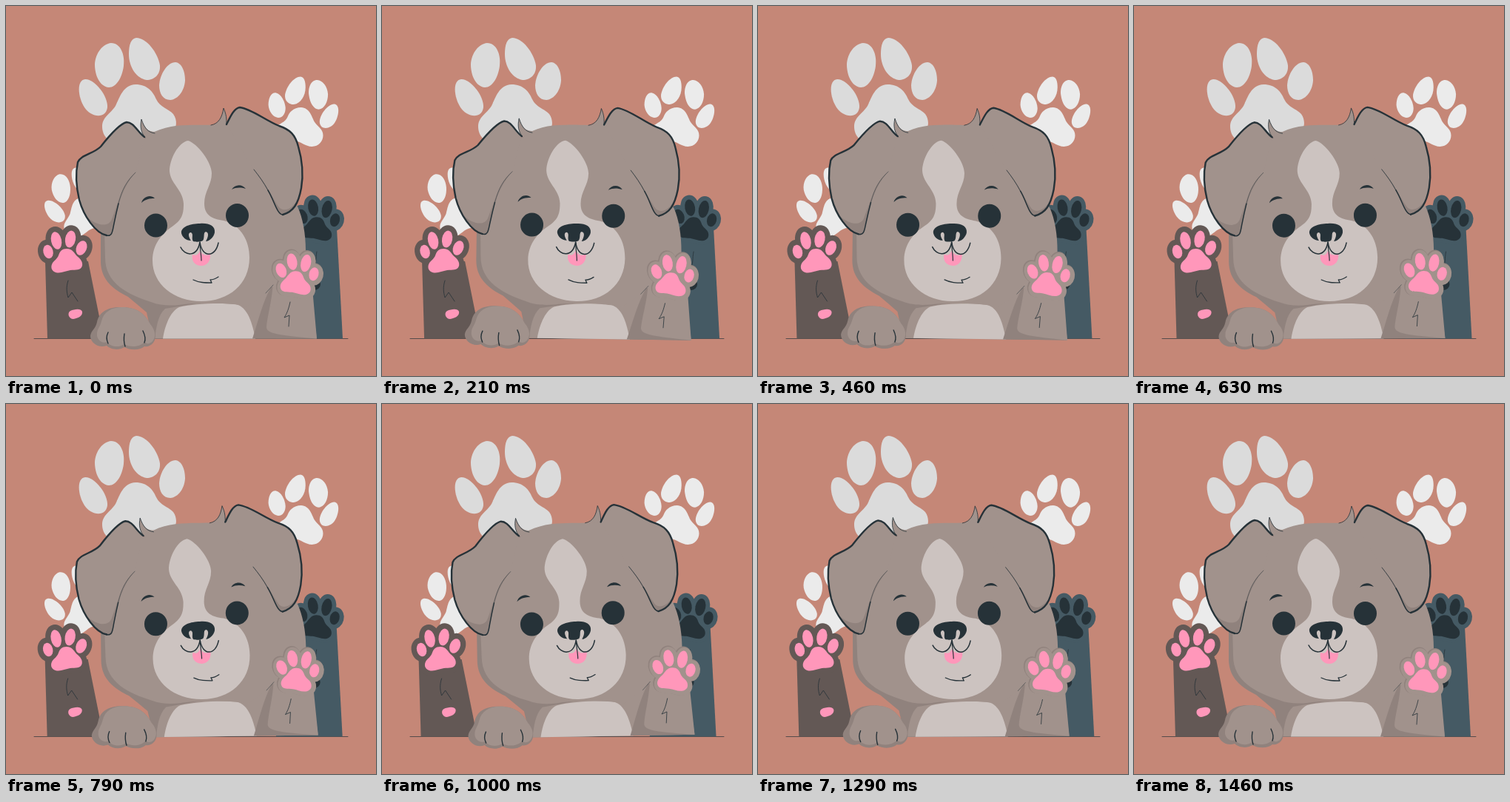
Recreate the animation shown at these times as an HTML page. Size 500 px wide and 500 px high, loop 1.5 s.

```html
<!DOCTYPE html>
<html lang="en">
<head>
<meta charset="utf-8">
<title>Waving paws</title>
<style>
  html, body { margin: 0; height: 100%; overflow: hidden; background: #c58777; }
  svg { display: block; width: 100vw; height: 100vh; }
  .fur { fill: #a1928c; }
  .shade { fill: #90827d; }
  .light { fill: #ccc3c0; }
  .ink { fill: #263238; }
  .pink { fill: #ff97ba; }
  .line { fill: none; stroke: #263238; stroke-linecap: round; stroke-linejoin: round; }
  .thin { stroke-width: .8; }
  .mid { stroke-width: 1.5; }
  .bold { stroke-width: 2.4; }
</style>
</head>
<body>
<svg viewBox="0 0 500 500">
  <defs>
    <g id="print">
      <path d="M-73-44C-61-45-42-22-43-6C-45 10-65 8-74-6C-83-20-85-43-73-44Z"/>
      <path d="M-38-93C-25-93-19-77-21-62C-23-46-31-33-41-33C-53-34-60-49-60-64C-59-80-49-92-38-93Z"/>
      <path d="M-4-100C10-100 25-80 28-63C29-50 20-43 10-43C-4-45-14-61-14-78C-14-91-11-99-4-100Z"/>
      <path d="M49-67C58-66 62-54 62-42C61-29 53-17 42-16C32-16 27-25 27-36C28-51 38-67 49-67Z"/>
      <path d="M-5-37C11-37 19-27 23-17C28-6 40-4 46 3C52 11 51 23 44 28C34 34 20 29 8 31C-5 33-14 43-27 43C-41 43-50 32-50 20C-50 7-39 3-32-8C-26-20-22-36-5-37Z"/>
    </g>
    <g id="pads">
      <ellipse rx="6.6" ry="9.3" transform="translate(-25 -13) rotate(-14)"/>
      <ellipse rx="7" ry="12" transform="translate(-14 -28) rotate(-12)"/>
      <ellipse rx="7" ry="11.5" transform="translate(5 -30) rotate(10)"/>
      <ellipse rx="7" ry="10.2" transform="translate(20 -18) rotate(22)"/>
      <path d="M0-17C8-17 10-11 14-7C19-3 22 1 21 6C19 13 12 11 5 12C-2 13-8 17-15 15C-21 13-22 7-19 2C-16-2-13-3-11-8C-9-14-6-17 0-17Z"/>
    </g>
  </defs>

  <rect width="500" height="500" fill="#c58777"/>
  <use href="#print" fill="#dbdbdb" transform="translate(180 143)"/>
  <use href="#print" fill="#ebebeb" transform="translate(395.5 161.5) scale(-.66 .66)"/>
  <use href="#print" fill="#ebebeb" transform="translate(108 282) rotate(-11) scale(.65)"/>
  <path class="line" stroke-width=".7" d="M38 449.5H462"/>

  <g class="shaking">
    <path fill="#635855" d="M53 345L56 449.500H132L111 345Z"/>
    <g transform="translate(82 345)">
      <use href="#pads" fill="#635855" stroke="#635855" stroke-width="14.500" stroke-linejoin="round"/>
      <use href="#pads" class="pink"/>
    </g>
    <path class="pink" d="M87 412C92 410 101 408 103 413C104 419 97 422 91 423C85 423 82 415 87 412Z"/>
    <path class="line thin" d="M84 371C81 380 82 387 84 394L89 387L97 399"/>
  </g>

  <g class="shaking">
    <path fill="#455a64" d="M398 305L365 449.500H455L447 300Z"/>
    <g transform="translate(420 302) scale(-.98 .98)">
      <use href="#pads" fill="#455a64" stroke="#455a64" stroke-width="12" stroke-linejoin="round"/>
      <use href="#pads" class="ink"/>
    </g>
    <ellipse class="ink" cx="416" cy="376" rx="9" ry="8"/>
    <path class="line thin" d="M420 332C418 342 420 348 416 354"/>
  </g>

  <g id="dog">
    <!-- body and head -->
    <path class="shade" d="M128 290V345C128 370 145 383 165 393L177 403L190 414L198 449.500H419L405 345Z"/>
    <path class="fur" d="M215 409C205 418 203 435 201 449.500H337L360 376L300 395Z"/>
    <path class="light" d="M212 449.500C214 435 221 413 234 407C253 402 290 401 310 403C327 406 333 430 337 449.500Z"/>
    <path class="fur" d="M188 178C204 165 226 161 246 161C262 160 282 162 299 159L394 271C401 286 405 308 405 330L402 372L358 380C347 393 334 401 325 406C310 401 255 400 234 404C222 405 208 405 196 400C165 390 134 375 134 340L133 300L150 200Z"/>
    <path class="light" d="M246 182C258 185 278 211 278 226C278 242 268 250 268 267C268 283 279 288 294 290C318 296 329 318 329 340C329 376 301 399 264 399C227 399 198 376 198 344C198 322 211 307 226 297C239 288 240 279 240 267C239 248 222 240 221 223C221 207 233 184 246 182Z"/>

    <!-- ears -->
    <path class="fur" d="M188 178C182 170 181 163 183 153C187 165 192 171 205 170Z"/>
    <path class="line thin" d="M188 178C182 170 181 163 183 153C187 165 192 171 201 172"/>
    <path class="fur" d="M187 177C178 171 173 157 163 157C154 159 139 176 128 190C118 200 101 201 97 211C94 225 95 245 99 262C105 284 121 307 136 311C144 312 144 303 146 294C151 268 158 244 175 225Z"/>
    <path class="shade" d="M175 225C156 240 151 270 143 288C139 299 124 298 109 285C116 297 126 308 136 310C144 311 144 303 146 294C151 268 158 244 175 225Z"/>
    <path class="line bold" d="M187 177C178 171 173 157 163 157C154 159 139 176 128 190C118 200 101 201 97 211C94 225 95 245 99 262C105 284 121 307 136 310"/>
    <path class="line mid" d="M136 310C144 312 144 303 146 294C148 284 150 275 152 267"/>
    <path class="line" stroke-width=".5" d="M152 267C157 247 163 237 175 225"/>
    <path class="fur" d="M276 162C288 159 292 150 294 138C298 147 298 152 298 160Z"/>
    <path class="line thin" d="M277 161C288 159 292 150 294 138C298 147 298 152 298 160"/>
    <path class="fur" d="M298 160C303 150 308 138 316 137C332 139 351 155 369 162C384 167 391 174 395 190C400 207 402 228 399 246C395 268 388 278 374 282C365 282 361 254 335 221Z"/>
    <path class="shade" d="M335 221C352 239 362 264 370 273C378 279 388 273 395 260C390 274 384 280 374 282C365 282 361 254 335 221Z"/>
    <path class="line bold" d="M298 160C303 150 308 138 316 137C332 139 351 155 369 162C384 167 391 174 395 190C400 207 402 228 399 246C395 268 388 278 374 282"/>
    <path class="line mid" d="M374 282C366 281 363 264 354 249"/>
    <path class="line thin" d="M354 249C348 238 342 230 335 221"/>

    <!-- face -->
    <ellipse class="ink" cx="202.500" cy="296.500" rx="15.500" ry="16"/>
    <ellipse class="ink" cx="312.500" cy="283" rx="15.500" ry="16"/>
    <path class="ink" d="M183 266C185 258 195 254 201 260C194 260 188 261 183 266Z"/>
    <path class="ink" d="M305 248C309 241 319 240 324 247C317 245 311 245 305 248Z"/>
    <path class="pink" d="M252 336C257 338 260 336 262 331C266 337 270 338 276 335C277 344 272 351 264 351C256 351 250 345 252 336Z"/>
    <path class="ink" d="M237 307C236 298 250 294 262 294C274 293 283 297 282 306C281 312 275 318 270 318C273 313 275 306 270 305C266 306 269 313 266 317C263 319 256 319 253 318C250 314 254 308 250 306C245 306 247 313 250 317C243 317 238 312 237 307Z"/>
    <path class="line mid" d="M236 326C241 337 258 341 262 319C265 341 283 340 287 320"/>
    <path class="line" stroke-width="1.200" d="M262 319C262 328 264 336 264 344"/>
    <path class="line" stroke-width="1.300" d="M253 370C261 374 269 374 278 374L276 370C281 370 284 368 287 366"/>

    <!-- raised arm -->
    <path class="shade" d="M358 380C347 400 341 425 333 449.500H420L411 380Z"/>
    <path class="fur" d="M361 370C360 398 354 414 352 434C352 443 370 445 420 449.500L413 370Z"/>
    <path class="line" stroke-width=".5" d="M361 377L351 388"/>
    <g transform="translate(391.500 375) scale(-.98 .98)">
      <use href="#pads" class="shade" stroke="#90827d" stroke-width="12" stroke-linejoin="round"/>
      <use href="#pads" class="fur" stroke="#a1928c" stroke-width="11" stroke-linejoin="round" x="-1" y="1"/>
      <use href="#pads" class="pink"/>
    </g>
    <path class="line thin" d="M384 400C382 409 380 415 376 421L383 418L382 433"/>

    <!-- resting paw -->
    <path class="shade" d="M114 446C115 438 121 437 123 427C126 412 140 406 157 407C177 407 188 416 195 430C202 438 204 449 199 455C196 459 191 461 187 460C180 466 167 465 160 461C152 466 141 464 136 459C125 463 114 455 114 446Z"/>
    <path class="fur" d="M123 443C123 437 127 434 129 426C132 413 143 407 157 407C177 407 188 416 195 430C202 438 203 447 198 453C194 457 190 457 187 454C180 462 166 461 160 457C153 462 141 461 137 454C129 457 122 450 123 443Z"/>
    <path class="line" stroke-width="1.400" d="M138 441C135 447 136 452 138 456M160 443C159 449 159 454 161 460M185 439C188 445 189 450 187 455"/>
  </g>
</svg>

<script>
  const LOOP = 1500;
  const dog = document.getElementById("dog");
  const shaking = document.querySelectorAll(".shaking");

  // Keys are [fraction of the loop, value].
  const sway = [[0, 0], [.25, 1], [.75, -1], [1, 0]];
  const shake = [[0, 0], [.1, -1], [.2, 2], [.3, -4], [.4, 4], [.5, -4],
                 [.6, 4], [.7, -4], [.8, 2], [.9, -1], [1, 0]];

  // cubic-bezier(.25, .1, .25, 1), solved by bisection
  function ease(x) {
    const bezier = (a, b, s) => 3 * a * s * (1 - s) ** 2 + 3 * b * s * s * (1 - s) + s ** 3;
    let low = 0, high = 1;
    for (let i = 0; i < 24; i++) {
      const mid = (low + high) / 2;
      if (bezier(.25, .25, mid) < x) low = mid; else high = mid;
    }
    return bezier(.1, 1, low);
  }

  function valueAt(keys, t) {
    const next = keys.findIndex(([at]) => at > t);
    const [t0, v0] = keys[next - 1], [t1, v1] = keys[next];
    return v0 + (v1 - v0) * ease((t - t0) / (t1 - t0));
  }

  function draw() {
    const t = performance.now() % LOOP / LOOP;
    dog.setAttribute("transform", `rotate(${valueAt(sway, t)} 262 300)`);
    const shift = `translate(${valueAt(shake, t)} 0)`;
    shaking.forEach(arm => arm.setAttribute("transform", shift));
    requestAnimationFrame(draw);
  }
  draw();
</script>
</body>
</html>
```
